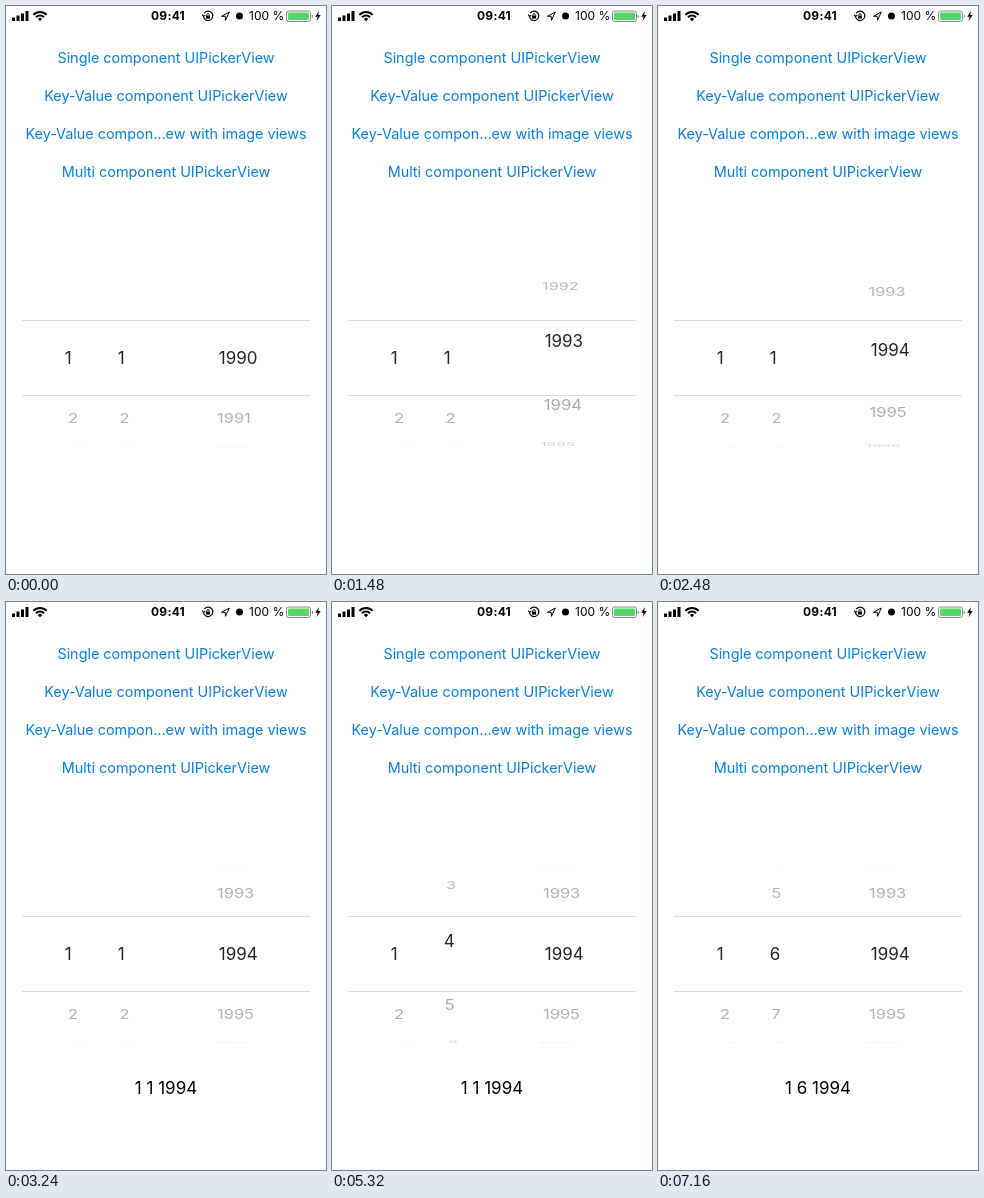
An HTML page that plays this animation: 320 px wide and 568 px high, repeating every 8 s.

```html
<!DOCTYPE html>
<html lang="en">
<head>
<meta charset="utf-8">
<title>Picker view</title>
<style>
  html, body { margin: 0; width: 100%; height: 100%; overflow: hidden; background: #fff; }
  svg { display: block; width: 100%; height: 100%; font-family: Inter, Roboto, sans-serif; }
  text { white-space: pre; }
  .links { font-size: 14.4px; fill: #057ee4; text-anchor: middle; }
  .status { font-size: 12px; }
  .wheel, .result { font-size: 17px; }
  .icon { fill: none; stroke: #000; }
</style>
</head>
<body>
<svg viewBox="0 0 320 568">
  <defs>
    <clipPath id="inside"><path d="M0 315H320V389H0z"/></clipPath>
    <clipPath id="outside"><path d="M0 263.5H320V314H0zM0 390H320V441H0z"/></clipPath>
  </defs>

  <g class="status">
    <path d="M6 11.5h3V15H6zM10.5 9.5h3V15h-3zM15 7.5h3V15h-3zM19.5 5h3v10h-3z"/>
    <path class="icon" stroke-width="2" d="M27.4 8.9a9 9 0 0 1 13.2 0M30 11.3a5.6 5.6 0 0 1 8 0"/>
    <path d="M34 15.2l-2.1-2.3a3 3 0 0 1 4.2 0z"/>
    <text x="162" y="14.4" font-weight="700" text-anchor="middle" letter-spacing=".02em">09:41</text>
    <path class="icon" stroke-width="1.2" d="M198.2 7.2a4.7 4.7 0 1 1-.8 2.8M196.3 8.6l1.2 1.9 1.8-1.3"/>
    <path d="M200 9.6h4v3h-4z"/>
    <path class="icon" stroke-width=".9" d="M200.8 9.6V8.8a1.2 1.2 0 0 1 2.4 0v.8"/>
    <path class="icon" d="M215.5 10.3L223.3 6l-3.8 8.3-.3-4z"/>
    <circle cx="233.5" cy="10" r="3.5"/>
    <text x="243" y="14.4">100 %</text>
    <rect class="icon" x="280.5" y="5" width="24" height="10.5" rx="2.2" style="stroke:#888"/>
    <rect x="282" y="6.5" width="21" height="7.5" rx="1" fill="#53d769"/>
    <path d="M305.8 8.4a2 2 0 0 1 0 3.7z" fill="#888"/>
    <path d="M312.9 5l-3.7 5.7h2.4l-.9 4.3 4-6h-2.5z"/>
  </g>

  <g class="links">
    <text x="160" y="56.5">Single component UIPickerView</text>
    <text x="160" y="94.5">Key-Value component UIPickerView</text>
    <text x="160" y="132.5">Key-Value compon…ew with image views</text>
    <text x="160" y="170.5">Multi component UIPickerView</text>
  </g>

  <path d="M16 314.5H304M16 389.5H304" stroke="#dcdcdc"/>
  <g class="wheel" id="near" clip-path="url(#inside)" fill="#222"></g>
  <g class="wheel" id="far" clip-path="url(#outside)"></g>
  <text class="result" id="result" x="160" y="492.4" text-anchor="middle"></text>
</svg>

<script>
const LOOP = 8000, RADIUS = 89.5, STEP = 42.5 * Math.PI / 180, DEPTH = 680;
const CX = 160, CY = 352.2, SLOTS = [-2, -1, 0, 1, 2, 3];
const $ = id => document.getElementById(id);

const out = p => f => 1 - (1 - f) ** p;
const speedUp = f => f * f;
const smooth = f => f * f * (3 - 2 * f);
const flick = f => 1 - (1 - f * f) ** 5;
const snap = out(5);

// Each move: start, end, row reached, easing
const wheels = [
  { x: 58.7, first: 1, moves: [] },
  { x: 111.8, first: 1, moves: [
    [4360, 5200, 3, flick], [5200, 5320, 3.19, speedUp],
    [5320, 6120, 5.3, out(2)], [6440, 7160, 5, snap]] },
  { x: 212.8, first: 1990, moves: [
    [200, 1040, 2, flick], [1040, 1480, 3.26, smooth],
    [1560, 2120, 4.35, out(2)], [2340, 3120, 4, snap]] }
];

function addText(parent) {
  const el = document.createElementNS("http://www.w3.org/2000/svg", "text");
  el.setAttribute("y", 6.2);
  return parent.appendChild(el);
}
for (const w of wheels)
  w.rows = SLOTS.map(() => [addText($("near")), addText($("far"))]);

function position(moves, t) {
  let row = 0;
  for (const [start, end, to, ease] of moves) {
    if (t < start) break;
    row += (to - row) * ease(Math.min(1, (t - start) / (end - start)));
  }
  return row;
}

function drawWheel({ x, first, moves, rows }, t) {
  const pos = position(moves, t), base = Math.floor(pos);
  rows.forEach(([near, far], i) => {
    const index = base + SLOTS[i], angle = (index - pos) * STEP, cos = Math.cos(angle);
    const shown = index >= 0 && Math.abs(angle) < 1.5;
    const scale = DEPTH / (DEPTH + RADIUS * (1 - cos));
    const left = CX + (x - CX) * scale, y = CY + RADIUS * Math.sin(angle);
    for (const el of [near, far]) {
      el.textContent = shown ? first + index : "";
      el.setAttribute("transform", `translate(${left} ${y}) scale(${scale} ${cos})`);
    }
    far.setAttribute("fill-opacity", shown ? .36 * Math.sqrt(cos) : 0);
  });
}

function draw(now) {
  const t = now % LOOP;
  for (const w of wheels) drawWheel(w, t);
  $("result").textContent = t < 3240 ? "" : t < 7160 ? "1 1 1994" : "1 6 1994";
}

const begin = performance.now();
function tick() {
  draw(performance.now() - begin);
  requestAnimationFrame(tick);
}
tick();
</script>
</body>
</html>
```
